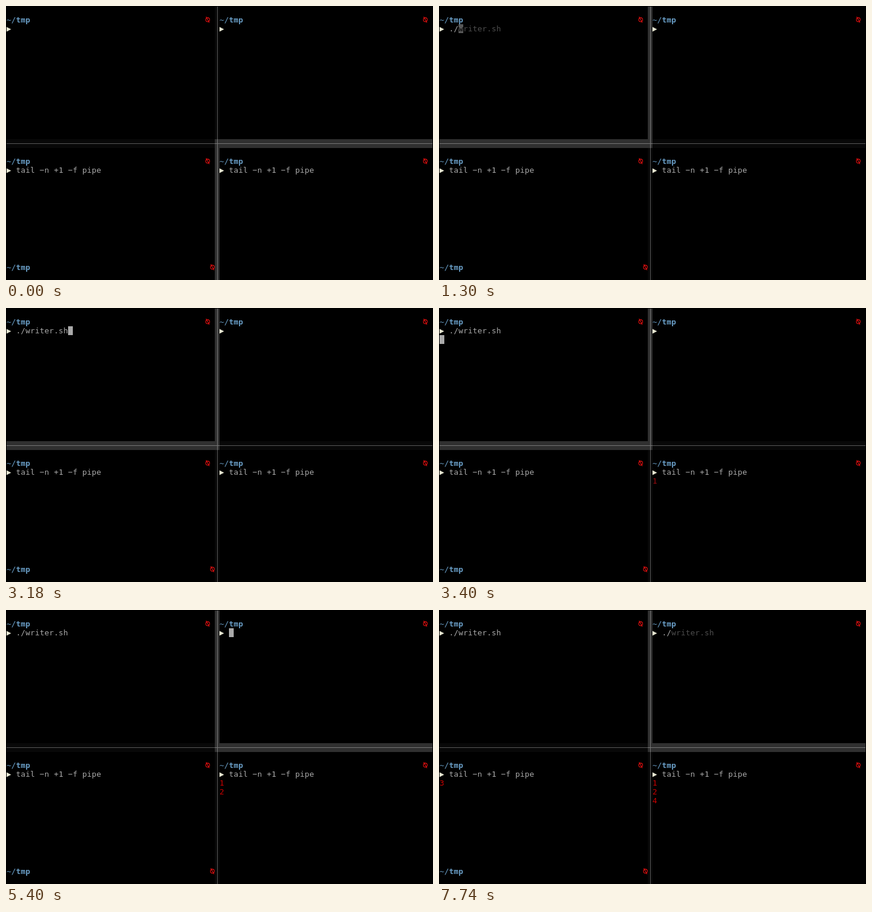
Write an HTML page with a canvas that moves like this. It is 722 px wide and 465 px high and loops after 8000 ms.

```html
<!DOCTYPE html>
<html lang="en">
<head>
<meta charset="utf-8">
<title>Split terminal</title>
<style>
  html, body { margin: 0; width: 100%; height: 100%; overflow: hidden; background: #000; }
  canvas { display: block; }
</style>
</head>
<body>
<canvas id="stage" width="722" height="465"></canvas>
<script>
const ctx = document.getElementById('stage').getContext('2d');
const LOOP = 8000, CELL_W = 8, CELL_H = 15, MID_COL = 44, MID_ROW = 15;
const COMMAND = './writer.sh';
const FONT = '13px "DejaVu Sans Mono", monospace';
const color = {
  text: '#aaaaaa', hint: '#4e4e4e', cursor: '#aaaaaa', hintCursor: '#585858',
  path: '#6a9fc8', arrow: '#e4e4d0', mark: '#ee1111', digit: '#cc0000', dimDigit: '#9c0c10',
  border: '#080808', borderLine: '#585858', active: '#303030', activeLine: '#767676'
};

// [time, typed characters, cursor shown]
const leftKeys = [[0, 0, 0], [770, 1, 0], [1300, 2, 1], [1400, 3, 1], [1830, 4, 1], [2010, 5, 1], [3180, 11, 1], [3400, 11, 0]];
const rightKeys = [[0, 0, 0], [4760, 0, 1], [6400, 1, 1], [6730, 2, 0]];
// [time, column, row, digit]
const outputs = [[3400, 45, 19, '1'], [5400, 45, 20, '2'], [7400, 0, 19, '3'], [7740, 45, 21, '4']];
// [time, focused column, focused row]
const focusKeys = [[0, 1, 1], [500, 0, 0], [4760, 1, 0]];

const x = col => 1 + col * CELL_W;
const y = row => 1 + row * CELL_H;
const at = (keys, t) => keys.filter(k => k[0] <= t).pop();

function box(left, top, right, bottom, fill) {
  ctx.fillStyle = fill;
  ctx.fillRect(left, top, right - left, bottom - top);
}

function write(str, col, row, fill, bold) {
  ctx.font = (bold ? 'bold ' : '') + FONT;
  ctx.fillStyle = fill;
  [...str].forEach((ch, i) => ctx.fillText(ch, x(col + i), y(row) + 12));
}

function cursor(col, row, fill) {
  box(x(col), y(row), x(col + 1), y(row + 1), fill);
}

function mark(col, row) {
  const cx = x(col) + 4, cy = y(row) + 7.3;
  ctx.strokeStyle = color.mark;
  ctx.lineWidth = 1.1;
  ctx.beginPath();
  ctx.ellipse(cx, cy, 3.2, 3.4, 0, 0, Math.PI * 2);
  ctx.moveTo(cx - 2.7, cy - 5);
  ctx.lineTo(cx + 2.7, cy + 5);
  ctx.stroke();
}

function path(col, row, markCol) {
  write('~/', col, row, color.path);
  write('tmp', col + 2, row, color.path, true);
  mark(markCol, row);
}

function prompt(col, row, markCol) {
  path(col, row, markCol);
  const px = x(col), py = y(row + 1);
  ctx.fillStyle = color.arrow;
  ctx.beginPath();
  ctx.moveTo(px, py + 4.5);
  ctx.lineTo(px + 7.7, py + 8.5);
  ctx.lineTo(px, py + 12.5);
  ctx.fill();
}

function typing(keys, col, row, t) {
  const [, count, shown] = at(keys, t);
  const covers = count > 0 && count < COMMAND.length;
  write(COMMAND.slice(0, count), col, row, color.text);
  if (count) write(COMMAND.slice(count), col + count, row, color.hint);
  if (!shown) return;
  cursor(col + count, row, covers ? color.hintCursor : color.cursor);
  if (covers) write(COMMAND[count], col + count, row, '#000');
}

function borders(t) {
  const [, fx, fy] = at(focusKeys, t);
  const l = x(MID_COL), r = x(MID_COL + 1), top = y(MID_ROW), bottom = y(MID_ROW + 1);
  const lineX = l + 4, lineY = top + 7;
  const areas = [
    [1, top, l, bottom, fx === 0], [r, top, 721, bottom, fx === 1],
    [l, 1, r, top, fy === 0], [l, bottom, r, 465, fy === 1],
    [l, top, r, bottom, true]
  ];
  for (const [a, b, c, d, on] of areas) {
    box(a, b, c, d, on ? color.active : color.border);
    const line = on ? color.activeLine : color.borderLine;
    if (b === top) box(a, lineY, c, lineY + 1, line);
    if (a === l) box(lineX, b, lineX + 1, d, line);
  }
}

function draw(t) {
  box(0, 0, 722, 465, '#000');
  borders(t);
  for (const [col, markCol] of [[0, 42], [45, 88]]) {
    prompt(col, 1, markCol);
    prompt(col, 17, markCol);
    write('tail \u2212n +1 \u2212f pipe', col + 2, 18, color.text);
  }
  path(0, 29, 43);
  typing(leftKeys, 2, 2, t);
  typing(rightKeys, 47, 2, t);
  if (t >= 3400 && t < 4760) cursor(0, 3, color.cursor);
  for (const [start, col, row, digit] of outputs) {
    if (t >= start) write(digit, col, row, t < 5400 ? color.dimDigit : color.digit);
  }
}

const start = performance.now();
function tick() {
  draw((performance.now() - start) % LOOP);
  requestAnimationFrame(tick);
}
tick();
</script>
</body>
</html>
```
